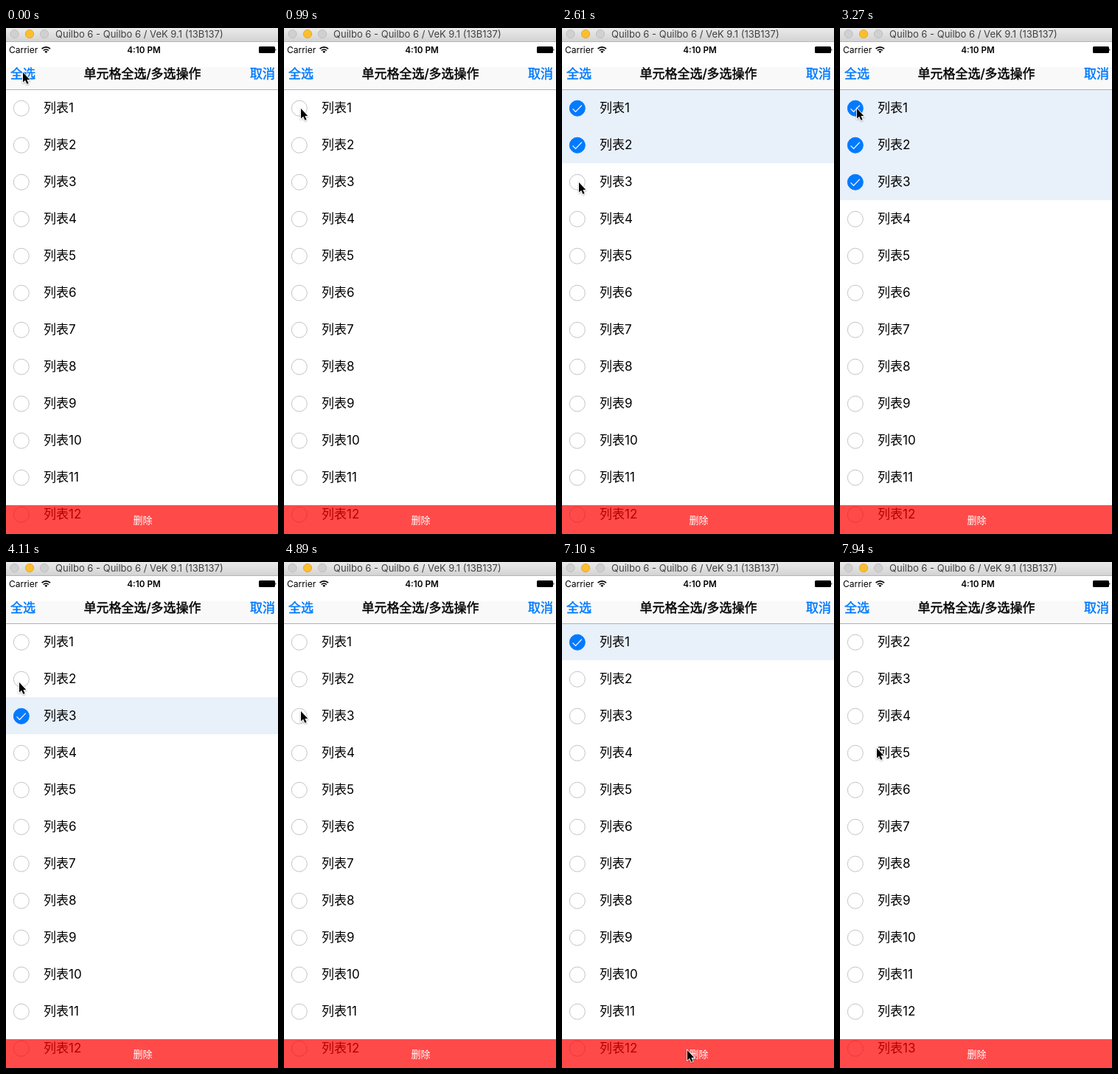
Write an HTML page that moves like this. It is 369x685 px and loops after 8 s.

```html
<!DOCTYPE html>
<html lang="zh-CN">
<head>
<meta charset="utf-8">
<title>列表</title>
<style>
  html, body { margin: 0; width: 100%; height: 100%; overflow: hidden; background: #fff; }
  svg { display: block; font-family: Inter, "Noto Sans CJK SC", "Noto Sans CJK", sans-serif; font-size: 17px; }
  .row .bg { fill: none; }
  .row .ring { fill: #fff; stroke: #c4c4c9; }
  .row .tick { fill: none; stroke: none; }
  .row.on .bg { fill: #e8f0fa; }
  .row.on .ring { fill: #007aff; stroke: #007aff; }
  .row.on .tick { stroke: #fff; stroke-width: 1.2; }
  .medium { stroke: currentColor; fill: currentColor; stroke-width: .45; }
  .link { color: #007aff; }
</style>
</head>
<body>
<svg width="369" height="685" viewBox="0 0 369 685">
  <defs>
    <linearGradient id="chrome" x2="0" y2="1">
      <stop stop-color="#ebebeb"/><stop offset="1" stop-color="#d3d3d3"/>
    </linearGradient>
    <filter id="shadow" x="-50%" y="-50%" width="200%" height="200%">
      <feDropShadow dx="0" dy="1" stdDeviation="0.8" flood-opacity=".35"/>
    </filter>
  </defs>
  <rect width="369" height="685" fill="#fff"/>

  <g id="list"></g>

  <!-- navigation bar -->
  <rect y="53" width="369" height="30" fill="#f9f9f9"/>
  <rect y="83" width="369" height="1" fill="#b0b0b0"/>
  <text class="medium link" x="6" y="67.5">全选</text>
  <text class="medium" x="185" y="67.5" text-anchor="middle">单元格全选/多选操作</text>
  <text class="medium link" x="365" y="67.5" text-anchor="end">取消</text>

  <!-- status bar -->
  <g font-size="12">
    <text x="4" y="33.5">Carrier</text>
    <text x="187" y="33.5" text-anchor="middle" font-size="11.7" font-weight="600">4:10 PM</text>
  </g>
  <g fill="none" stroke="#000" stroke-width="1.7">
    <path d="M48.6 28.2a8 8 0 0 1 11.4 0M50.8 30.5a5 5 0 0 1 7 0"/>
    <path d="M54.3 34l-2-2.1a2.8 2.8 0 0 1 4 0z" fill="#000" stroke="none"/>
  </g>
  <rect x="343" y="25" width="22" height="9" rx="1.5"/>
  <path d="M365.5 28q2 1.5 0 3z"/>

  <!-- window title -->
  <rect width="369" height="18" fill="url(#chrome)"/>
  <rect y="18" width="369" height="1" fill="#b5b5b5"/>
  <g fill="#d0d0d0" stroke="#b8b8b8" stroke-width=".8">
    <circle cx="11.5" cy="8" r="5.6"/>
    <circle cx="32" cy="8" r="5.6" fill="#fdbe2e" stroke="#dfa023"/>
    <circle cx="52" cy="8" r="5.6"/>
  </g>
  <text x="67" y="13" font-size="13" fill="#404040">Quilbo 6 - Quilbo 6 / VeK 9.1 (13B137)</text>

  <!-- delete bar -->
  <rect y="646" width="369" height="39" fill="#f00" fill-opacity=".71"/>
  <text x="185.5" y="671" text-anchor="middle" font-size="13" fill="#fff">删除</text>

  <path id="cursor" d="M1 1V14.5L4.1 11.7L6.4 16.8L8.6 15.9L6.4 10.9H10.3Z" stroke="#fff" stroke-width="1.6"
        paint-order="stroke" filter="url(#shadow)"/>
</svg>
<script>
const LOOP = 8000, STEP = 60, HOP_STEPS = 6;
const TOP = 83, ROW_HEIGHT = 50, ROWS = 12, CYCLE = 3;
const REMOVE_AT = 7640;

// Taps go round the first three rows: select each, deselect each, start again.
const tapTimes = [1350, 2130, 2850, 3510, 4110, 4890, 6020];

const overRow = row => ({ x: 22 - 5 * (row % 2), y: TOP + 25 + row * ROW_HEIGHT });
const start = { x: 22, y: 59 };
const hops = [
  { at: 570, to: overRow(0) },
  ...tapTimes.slice(0, -1).map((at, i) => ({ at, to: overRow((i + 1) % CYCLE) })),
  { at: 6260, to: { x: 169, y: 660 }, steps: 2 * HOP_STEPS },
  { at: REMOVE_AT, to: { x: 49, y: 251 } }
];

const list = document.getElementById("list");
const cursor = document.getElementById("cursor");

list.innerHTML = Array.from({ length: ROWS }, (_, i) => `
  <g class="row" transform="translate(0 ${TOP + i * ROW_HEIGHT})">
    <rect class="bg" width="369" height="${ROW_HEIGHT}"/>
    <circle class="ring" cx="20.8" cy="25.7" r="10.5"/>
    <path class="tick" d="M14.5 26.3l4 4l8.3-8.6"/>
    <text x="51" y="31"></text>
  </g>`).join("");
const rows = [...list.children];

function cursorAt(t) {
  let { x, y } = start;
  for (const { at, to, steps = HOP_STEPS } of hops) {
    if (t < at) break;
    const p = Math.min(1, (Math.floor((t - at) / STEP) + 1) / steps);
    const ease = p * p * (3 - 2 * p);
    x += (to.x - x) * ease;
    y += (to.y - y) * ease;
  }
  return [Math.round(x), Math.round(y)];
}

function draw(t) {
  const removed = t >= REMOVE_AT;
  const taps = tapTimes.filter(time => t >= time);
  rows.forEach((row, i) => {
    const flips = taps.filter((_, n) => n % CYCLE === i).length;
    row.classList.toggle("on", !removed && flips % 2 === 1);
    row.lastElementChild.textContent = "列表" + (i + (removed ? 2 : 1));
  });
  cursor.setAttribute("transform", `translate(${cursorAt(t)})`);
}

const begin = performance.now();
function frame() {
  draw((performance.now() - begin) % LOOP);
  requestAnimationFrame(frame);
}
frame();
</script>
</body>
</html>
```
